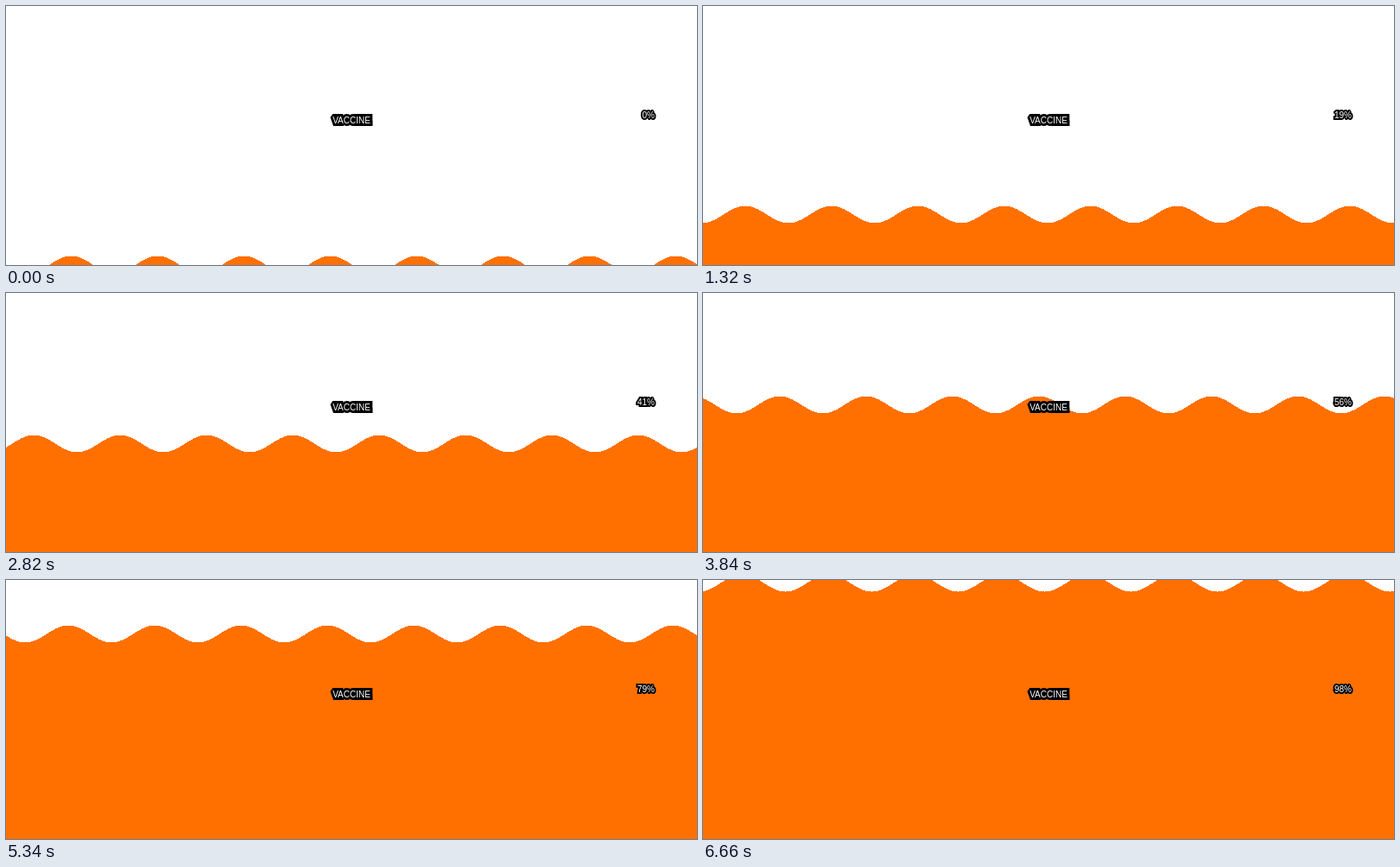
An HTML page with a canvas for the animation above (6.72 s loop, 800 by 300 pixels).

```html
<!DOCTYPE html>
<html lang="en">
<head>
<meta charset="utf-8">
<title>Vaccine progress</title>
<style>
  html, body { margin: 0; width: 100%; height: 100%; overflow: hidden; background: #fff; }
  canvas { display: block; }
</style>
</head>
<body>
<canvas id="stage" width="800" height="300"></canvas>
<script>
const W = 800, H = 300;
const STEP = 60, STEPS = 112;      // ms per step, steps per loop
const RATE = 15, DURATION = 7.5;   // steps per unit of time, time to reach 100 %
const AMP = 10, PERIOD = 100, SPEED = 50;

const ctx = document.getElementById('stage').getContext('2d');

function drawWave(time, share) {
  const level = H - Math.floor(H * share);
  ctx.fillStyle = '#ff7000';
  for (let x = 0; x < W; x++) {
    const swing = AMP * Math.sin(2 * Math.PI * (x - SPEED * time) / PERIOD);
    const top = Math.floor(level + swing);
    ctx.fillRect(x, top, 1, H - top);
  }
}

function drawLabel(text, x, y, align, outline) {
  ctx.font = '10px "Liberation Sans", Arial, sans-serif';
  ctx.textAlign = align;
  ctx.textBaseline = 'alphabetic';
  ctx.lineJoin = 'miter';
  ctx.miterLimit = 1.6;   // square corners stay sharp, acute ones are cut off
  ctx.lineWidth = outline;
  ctx.strokeStyle = '#000';
  ctx.strokeText(text, x, y);
  ctx.fillStyle = '#fff';
  ctx.fillText(text, x, y);
}

function draw(n) {
  const time = n / RATE;
  const share = time / DURATION;
  ctx.fillStyle = '#fff';
  ctx.fillRect(0, 0, W, H);
  drawWave(time, share);
  drawLabel('VACCINE', W / 2, 136, 'center', 6);
  drawLabel(Math.floor(100 * share) + '%', 751, 130, 'right', 4);
}

const start = performance.now();

function tick(now) {
  draw(Math.floor(Math.max(0, now - start) / STEP) % STEPS);
  requestAnimationFrame(tick);
}

draw(0);
requestAnimationFrame(tick);
</script>
</body>
</html>
```
